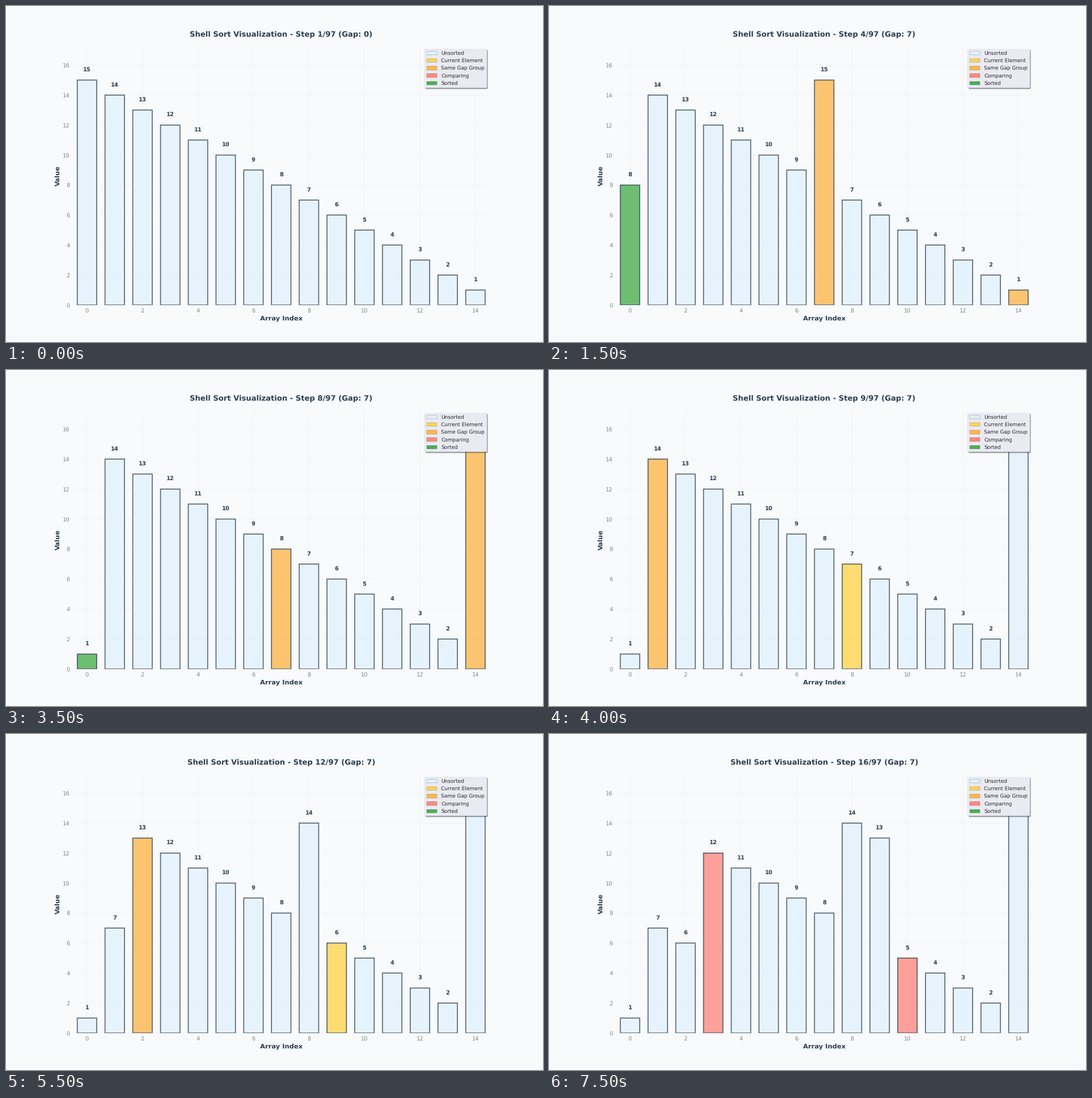
A matplotlib script for the animation above (8 s loop, 947 by 592 pixels).

```python
import matplotlib.pyplot as plt
from matplotlib.animation import FuncAnimation
from matplotlib.patches import Patch

DPI = 59.1875
INK, MUTED, BACK = "#2C3E50", "#7F8C8D", "#F8FAFC"
UNSORTED, CURRENT, GROUP = "#E3F2FD", "#FFD54F", "#FFB74D"
COMPARE, SORTED = "#FF8A80", "#4CAF50"
COUNT, SHOWN = 15, 16


def shell_sort_steps(data):
    """List (values, gap, group, {index: colour}) for every step of the sort."""
    a = list(data)
    steps = [(a[:], 0, [], {})]
    gap = len(a) // 2
    while gap:
        for start in range(gap):
            group = range(start, len(a), gap)
            for i in group[1:]:
                steps.append((a[:], gap, group, {i: CURRENT}))
                held, j = a[i], i
                while j >= gap and a[j - gap] > held:
                    steps.append((a[:], gap, group, {j: COMPARE, j - gap: COMPARE}))
                    a[j] = a[j - gap]
                    j -= gap
                a[j] = held
                steps.append((a[:], gap, group, {j: SORTED}))
        gap //= 2
    steps.append((a[:], 0, [], dict.fromkeys(range(len(a)), SORTED)))
    return steps


steps = shell_sort_steps(range(COUNT, 0, -1))

plt.rcParams.update({"font.family": "DejaVu Sans", "text.hinting": "none"})
fig, ax = plt.subplots(figsize=(947 / DPI, 592 / DPI), dpi=DPI, facecolor=BACK)
ax.set_facecolor(BACK)
ax.set_axisbelow(True)
ax.grid(True, color="#E0E0E0", alpha=0.3, linewidth=1, snap=False)
ax.spines[:].set_visible(False)
ax.tick_params(length=0, pad=7, labelsize=12, labelcolor=MUTED)
bold = dict(fontweight="bold", color=INK)
ax.set_xlabel("Array Index", fontsize=14, **bold)
ax.set_ylabel("Value", fontsize=14, **bold)
title = ax.set_title("", fontsize=16, pad=20, **bold)

bars = ax.bar(range(COUNT), steps[0][0], width=0.7, color=UNSORTED,
              edgecolor=INK, linewidth=2, alpha=0.8, snap=False)
labels = [ax.text(i, 0, "", ha="center", va="bottom", fontsize=12, **bold)
          for i in range(COUNT)]
ax.set_xlim(-0.5, COUNT - 0.5)
ax.set_ylim(0, COUNT * 1.15)

entries = [("Unsorted", UNSORTED), ("Current Element", CURRENT),
           ("Same Gap Group", GROUP), ("Comparing", COMPARE), ("Sorted", SORTED)]
legend = ax.legend(
    handles=[Patch(facecolor=c, edgecolor=INK, linewidth=0.3, label=name)
             for name, c in entries],
    loc="upper right", fontsize=11, shadow=True, fancybox=True,
    framealpha=1, facecolor="#EAEAF2", edgecolor="0.8", labelcolor="0.15")
legend.get_frame().set_linewidth(0.3)


def update(n):
    values, gap, group, marks = steps[n]
    for i, (bar, label, v) in enumerate(zip(bars, labels, values)):
        bar.set_height(v)
        bar.set_facecolor(marks.get(i, GROUP if i in group else UNSORTED))
        label.set_position((i, v + 0.5))
        label.set_text(str(v))
    title.set_text(f"Shell Sort Visualization - Step {n + 1}/{len(steps)} (Gap: {gap})")
    return [*bars, *labels, title]


anim = FuncAnimation(fig, update, frames=SHOWN, interval=500,
                     repeat=True, repeat_delay=0, blit=False)
plt.show()
```
